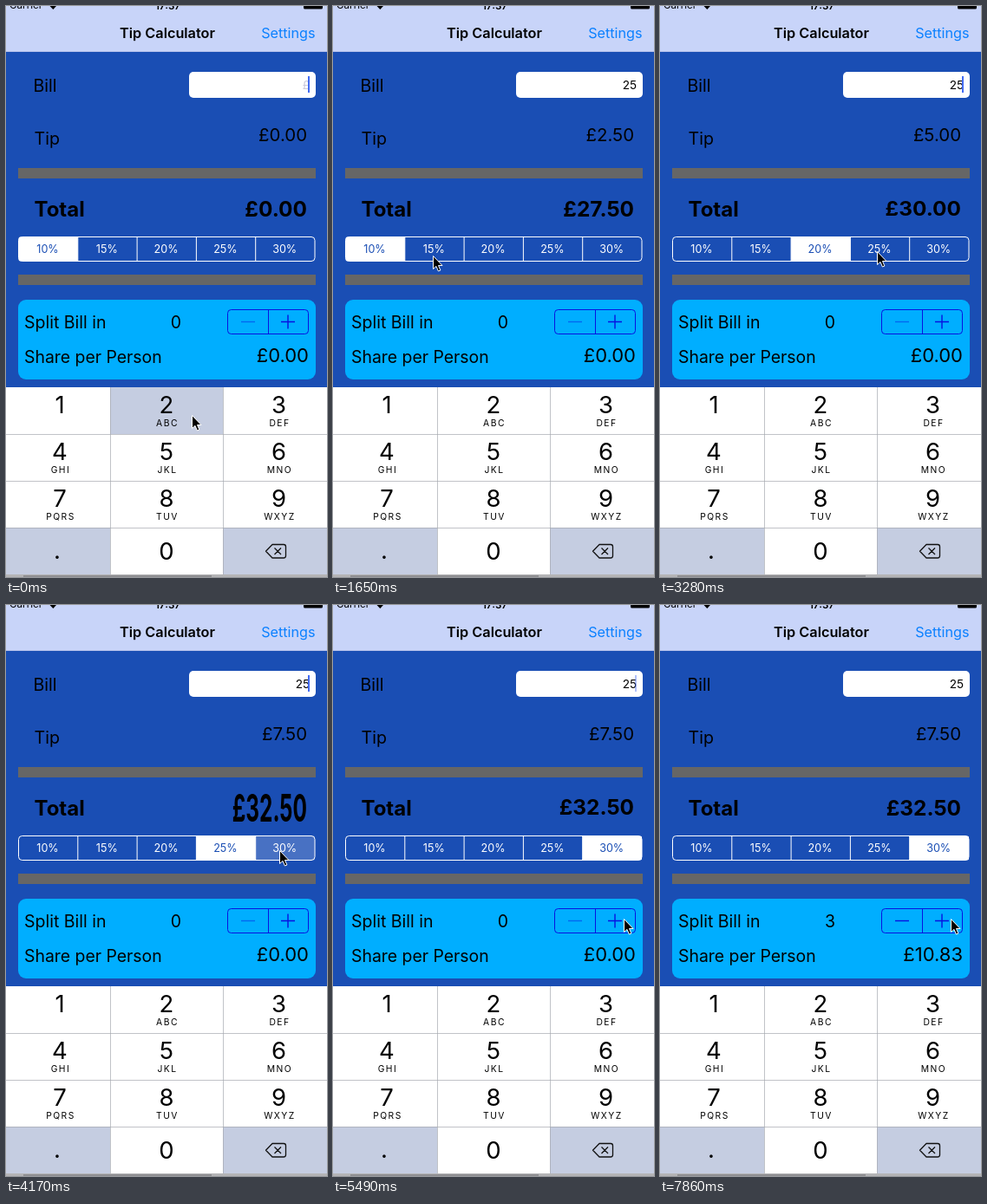
An HTML page for the animation above (8 s loop, 370x659 px).

```html
<!DOCTYPE html>
<html lang="en">
<head>
<meta charset="utf-8">
<title>Tip Calculator</title>
<style>
html, body { margin: 0; width: 100%; height: 100%; overflow: hidden; background: #1a4eb4; }
svg { display: block; width: 370px; height: 659px; font-family: Inter, Roboto, sans-serif; }
</style>
</head>
<body>
<svg id="stage" viewBox="0 0 370 659"></svg>
<script>
const LOOP = 8000, STEP = 148.2, LAST_STEP = 53;
const BLUE = '#1a4eb4', TINT = '#0812e0', GREY_KEY = '#c5cde1';
const RATES = [10, 15, 20, 25, 30];
const RATE_PRESSES = [-99, 12, 18, 23, 28];
const SPLIT_PRESSES = [44, 49, 52];
// Pointer stops: step, x, y
const POINTER = [
  [0, 214, 472], [1, 214, 472], [3, 198, 523], [7, 198, 523], [11, 115, 288],
  [13, 115, 288], [15, 168, 285], [17, 186, 290], [20, 186, 290], [22, 250, 283],
  [25, 250, 283], [27, 315, 283], [30, 315, 283], [34, 334, 375], [37, 335, 362]
];

const clamp = v => Math.max(0, Math.min(1, v));
const money = v => '£' + v.toFixed(2);
const rect = (x, y, w, h, fill, extra = '') =>
  `<rect x="${x}" y="${y}" width="${w}" height="${h}" fill="${fill}" ${extra}/>`;
const path = (d, stroke, width = 1, extra = '') =>
  `<path d="${d}" fill="none" stroke="${stroke}" stroke-width="${width}" ${extra}/>`;
const text = (s, x, y, size, anchor = 'start', extra = '') =>
  `<text x="${x}" y="${y}" font-size="${size}" text-anchor="${anchor}" ${extra}>${s}</text>`;

function pointerAt(step) {
  const next = POINTER.findIndex(p => p[0] > step);
  if (next < 0) return POINTER.at(-1).slice(1);
  const [s0, x0, y0] = POINTER[next - 1], [s1, x1, y1] = POINTER[next];
  const k = (step - s0) / (s1 - s0);
  return [x0 + (x1 - x0) * k, y0 + (y1 - y0) * k];
}

function caretAlpha(ms) {
  const phase = ms % 1000 / 1000;
  if (ms < 1400 || phase < .42) return 1;
  return phase < .7 ? clamp((.53 - phase) / .11) : clamp((phase - .88) / .1);
}

function totalStretch(step, press) {
  const s = (step - press) * STEP / 1000;
  return 1 + .8 * Math.exp(-3.6 * s) * Math.cos(6 * s);
}

function header() {
  return rect(0, 0, 370, 53, '#c8d4f9') + rect(0, 52.5, 370, .5, '#a4b1dc') +
    text('Carrier', 4, 3, 11.7) + '<path d="M50.5 0H58L54.3 4Z"/>' +
    text('17:37', 186.5, 3.5, 11.7, 'middle', 'font-weight="600"') +
    rect(343, -5, 22, 8.5, '#000', 'rx="1.5"') +
    text('Tip Calculator', 186, 37, 16.3, 'middle', 'font-weight="600"') +
    text('Settings', 356.5, 37, 16.2, 'end', 'fill="#0a80ff"');
}

function billField(bill, ms) {
  return text('Bill', 31.5, 98.5, 19.6) + rect(211, 76, 146, 30, '#fff', 'rx="5"') +
    text(bill || '£', 350, 95.5, 13.6, 'end', bill ? '' : 'fill="#c9c9dc"') +
    rect(348, 81, 2, 19, '#426bf2', `opacity="${caretAlpha(ms)}"`);
}

function rateControl(step) {
  const selected = RATE_PRESSES.findLastIndex(p => step > p);
  const cells = RATES.map((rate, i) => {
    const x = 14.5 + i * 68.3, on = i === selected;
    const alpha = on ? 1 : step === RATE_PRESSES[i] ? .2 : 0;
    return rect(x, 266.5, 68.3, 28, '#fff', `fill-opacity="${alpha}"`) +
      (i ? path(`M${x} 266V295`, '#fff') : '') +
      text(rate + '%', x + 33.5, 285, 12.6, 'middle', `fill="${on ? BLUE : '#fff'}"`);
  }).join('');
  return `<clipPath id="round"><rect x="14" y="266" width="342.5" height="29" rx="4"/></clipPath>
    <g clip-path="url(#round)">${cells}</g>` +
    rect(14.5, 266.5, 341.5, 28, 'none', 'rx="4" stroke="#fff"');
}

function splitCard(step, total) {
  const people = SPLIT_PRESSES.filter(p => step >= p).length;
  const pressed = SPLIT_PRESSES.includes(step);
  return rect(14, 339, 343, 92, '#00aeff', 'rx="9"') +
    text('Split Bill in', 21, 372, 19.5) + text(people, 196, 372, 19.5, 'middle') +
    text('Share per Person', 21, 412, 19.4) +
    text(money(people ? total / people : 0), 349, 411, 22, 'end') +
    (pressed ? rect(302, 350, 47, 29, TINT, 'opacity=".25"') : '') +
    rect(255.5, 350.5, 93, 28, 'none', `rx="4" stroke="${TINT}"`) +
    path('M302.5 350V379', TINT) +
    path('M271 364.5H287', TINT, 1.4, `opacity="${people ? 1 : .45}"`) +
    path('M317 364.5H333M325 356.5V372.5', TINT, 1.4);
}

function keypad(step) {
  const letters = ['', 'ABC', 'DEF', 'GHI', 'JKL', 'MNO', 'PQRS', 'TUV', 'WXYZ'];
  const edges = [0, 120, 250, 370], centers = [62, 185, 314.5];
  const pressed = step < 1 ? 2 : step === 5 || step === 6 ? 5 : 0;
  let out = rect(0, 440, 370, 216, '#fff');
  letters.forEach((label, i) => {
    const col = i % 3, y = 440 + Math.floor(i / 3) * 54;
    if (pressed === i + 1) out += rect(edges[col], y, edges[col + 1] - edges[col], 54, GREY_KEY);
    out += text(i + 1, centers[col], y + 30, 27.5, 'middle') +
      text(label, centers[col] + 1, y + 45, 10.3, 'middle', 'letter-spacing="1.5"');
  });
  return out + rect(0, 602, 120, 54, GREY_KEY) + rect(250, 602, 120, 54, GREY_KEY) +
    text('.', 59, 638, 27.5, 'middle') + text('0', 185, 639, 27.5, 'middle') +
    path('M307 621.5H320Q322.5 621.5 322.5 624V634.5Q322.5 637 320 637H307L299.5 629.2ZM309.5 625.5L317 633M317 625.5L309.5 633', '#111', 1.3, 'stroke-linejoin="round"') +
    path('M0 494.5H370M0 548.5H370M0 602.5H370M120.5 440V656M250.5 440V656', '#a6a9b0', .7) +
    rect(0, 656, 370, 3, '#b4b4b6') + rect(20, 657, 217, 2, '#8f8f92');
}

function pointer(step) {
  const [x, y] = pointerAt(step);
  return `<path transform="translate(${x} ${y})" d="M.5 .5V15.5L4 12.4 6.4 18 8.9 17 6.5 11.5H11Z"
    fill="#000" stroke="#fff" stroke-width="1"/>`;
}

function scene(step) {
  const bill = step < 1 ? '' : step < 7 ? '2' : '25';
  const chosen = RATE_PRESSES.findLastIndex(p => step >= p);
  const tip = bill * RATES[chosen] / 100, total = +bill + tip;
  const stretch = totalStretch(step, RATE_PRESSES[chosen]);
  return rect(0, 0, 370, 659, BLUE) + header() + billField(bill, step * STEP) +
    text('Tip', 32.5, 160, 19.6) + text(money(tip), 347, 156, 20.4, 'end') +
    rect(14, 187, 343, 12, '#666') + rect(14, 310, 343, 12, '#666') +
    text('Total', 32.5, 242.5, 24, 'start', 'font-weight="700"') +
    `<g transform="translate(347 233.5) scale(1 ${stretch})">` +
    text(money(total), 0, 9, 24.4, 'end', 'font-weight="700"') + '</g>' +
    rateControl(step) + splitCard(step, total) + keypad(step) + pointer(step);
}

const stage = document.getElementById('stage');
const start = performance.now();
let shown = -1;
function draw() {
  const ms = (performance.now() - start) % LOOP;
  const step = Math.min(LAST_STEP, Math.floor(ms / STEP));
  if (step !== shown) stage.innerHTML = scene(shown = step);
  requestAnimationFrame(draw);
}
draw();
</script>
</body>
</html>
```
